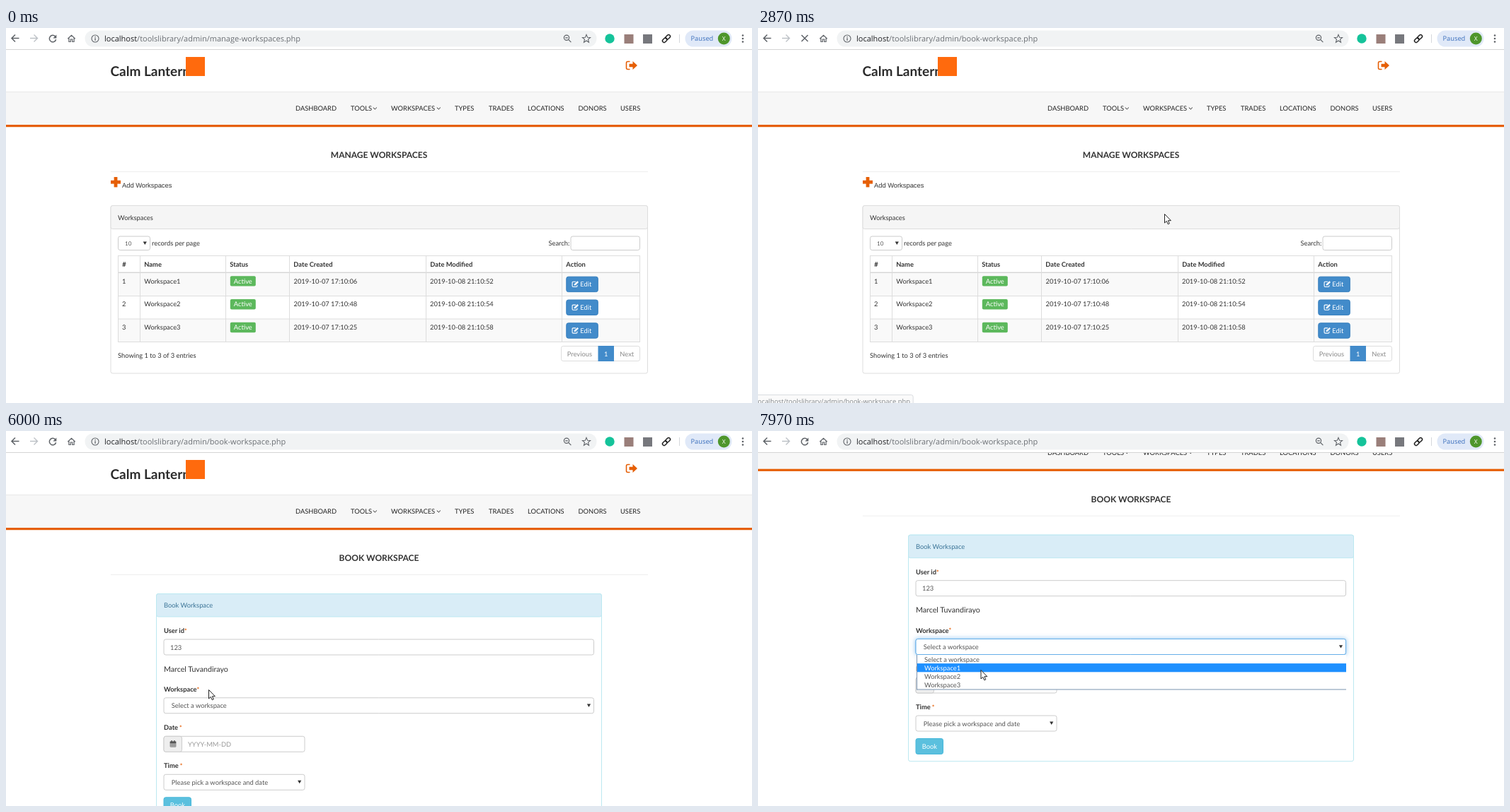
Write an HTML page with a canvas that moves like this. It is 1054 px wide and 531 px high and loops after 8000 ms.

```html
<!DOCTYPE html>
<html lang="en">
<head>
<meta charset="utf-8">
<title>Booking a workspace</title>
<style>
html, body { margin: 0; width: 100%; height: 100%; overflow: hidden; background: #fff; }
canvas { display: block; }
</style>
</head>
<body>
<canvas id="stage" width="1054" height="531"></canvas>
<script>
const ctx = document.getElementById('stage').getContext('2d', { alpha: false });
const LOOP = 8000;
const ORANGE = '#e65f06', BLUE = '#428bca', INK = '#333', ICON = '#5f6368';
const SITE = 'localhost/toolslibrary/admin/';

// Bursts of screen updates: first, last, number of updates.
const bursts = [
  [0, 0, 1], [220, 1000, 11], [1070, 1850, 11], [1930, 2540, 9], [2710, 3250, 8],
  [3420, 4130, 10], [4590, 4590, 1], [4740, 4740, 1], [4900, 4980, 2], [5130, 5910, 11],
  [6000, 6370, 6], [6520, 6910, 6], [7060, 7820, 11], [7900, 7970, 2]
];

// Pointer path: time, x, y.
const path = [
  [0, 985, 560], [210, 968, 522], [1000, 547, 111], [1070, 562, 105], [1148, 568, 115],
  [1850, 573, 224], [2540, 574, 263], [3341, 574, 263], [3578, 553, 282], [4050, 500, 310],
  [5052, 500, 310], [5500, 133, 343], [5620, 133, 343], [5910, 258, 361], [6000, 286, 366],
  [6370, 330, 403], [6600, 330, 403], [6910, 333, 350], [6985, 333, 350], [7362, 312, 301],
  [7590, 312, 303], [7820, 314.5, 333], [7970, 314.5, 338]
];

function snap(t) {
  const [start, end, count] = bursts.filter(b => b[0] <= t).pop();
  if (count === 1) return start;
  const step = (end - start) / (count - 1);
  return Math.min(end, start + Math.floor((t - start) / step + 1e-6) * step);
}

function pointerAt(t) {
  const i = path.findIndex(p => p[0] >= t);
  if (i <= 0) return path[0].slice(1);
  const [t0, x0, y0] = path[i - 1], [t1, x1, y1] = path[i];
  const p = (t - t0) / (t1 - t0), e = p * p * (3 - 2 * p);
  return [x0 + (x1 - x0) * e, y0 + (y1 - y0) * e];
}

function scrollAt(t) {
  if (t < 6520) return 0;
  const p = Math.min(1, (t - 6520 + 78) / 468);
  return 83.3 * (1 - (1 - p) ** 4.18);
}

// y is the middle of the capitals.
function text(s, x, y, { color = INK, size = 9.33, weight = 400, family = 'Lato', align = 'left' } = {}) {
  ctx.font = `${weight} ${size}px "${family}", sans-serif`;
  ctx.textAlign = align;
  ctx.fillStyle = color;
  ctx.fillText(s, x, y + size * 0.36);
  return ctx.measureText(s).width;
}

function rect(x, y, w, h, color) {
  ctx.fillStyle = color;
  ctx.fillRect(x, y, w, h);
}

function box(x, y, w, h, { fill = '#fff', stroke, r = 2.7 } = {}) {
  ctx.beginPath();
  ctx.roundRect(x + 0.5, y + 0.5, w - 1, h - 1, r);
  ctx.fillStyle = fill;
  ctx.fill();
  if (stroke) line(stroke);
}

function line(color, width = 1) {
  ctx.strokeStyle = color;
  ctx.lineWidth = width;
  ctx.stroke();
}

function circle(x, y, r, color) {
  ctx.beginPath();
  ctx.arc(x, y, r, 0, 7);
  ctx.fillStyle = color;
  ctx.fill();
}

function shape(d, x, y, { fill, stroke, width = 1 } = {}) {
  const p = new Path2D(d);
  ctx.save();
  ctx.translate(x, y);
  ctx.lineWidth = width;
  if (fill) { ctx.fillStyle = fill; ctx.fill(p); }
  if (stroke) { ctx.strokeStyle = stroke; ctx.stroke(p); }
  ctx.restore();
}

const arrowDown = (x, y) => shape('M-2.6-2H2.6L0 2.4Z', x, y, { fill: INK });

function field(x, y, w, h, focused) {
  if (focused) {
    ctx.save();
    ctx.shadowColor = 'rgba(102,175,233,.7)';
    ctx.shadowBlur = 6;
    box(x, y, w, h, { stroke: '#66afe9' });
    ctx.restore();
  }
  box(x, y, w, h, { stroke: focused ? '#66afe9' : '#ccc' });
}

function toolbar(t) {
  const loading = t >= 2710 && t < 3250;
  const pen = { stroke: ICON, width: 1.5 };
  rect(0, 0, 1054, 30, '#fff');
  rect(0, 30, 1054, 1, '#d4d4d4');
  shape('M5.5 0H-5M0-5L-5 0 0 5', 13, 14.5, pen);
  shape('M-5.5 0H5M0-5L5 0 0 5', 39.5, 14.5, { stroke: '#bdc1c6', width: 1.4 });
  if (loading) shape('M-4.5-4.5L4.5 4.5M4.5-4.5L-4.5 4.5', 66, 14.5, pen);
  else {
    shape('M3.6-3A4.7 4.7 0 1 0 4.6 1.2', 66, 15, pen);
    shape('M5.3-5.5V-.6H.4Z', 66, 15, { fill: ICON });
  }
  shape('M-5.2.3L0-4.6 5.2.3M-3.6-.8V4.5H-1.2V1H1.2V4.5H3.6V-.8', 92.5, 15, { stroke: ICON, width: 1.2 });

  box(111, 3, 724, 24, { fill: '#f1f3f4', r: 12 });
  ctx.beginPath();
  ctx.arc(126, 15, 5, 0, 7);
  line(ICON, 1.1);
  rect(125.4, 14.2, 1.3, 3.6, ICON);
  rect(125.4, 12, 1.3, 1.3, ICON);
  const url = { size: 11, family: 'Open Sans' };
  const hostWidth = text('localhost', 139, 15, { ...url, color: '#202124' });
  const page = t < 2710 ? 'manage-workspaces.php' : 'book-workspace.php';
  text('/toolslibrary/admin/' + page, 139 + hostWidth, 15, { ...url, color: '#6b6f74' });

  ctx.beginPath();
  ctx.arc(792, 13.8, 3.6, 0, 7);
  line(ICON, 1.2);
  shape('M2.6 2.6L6.4 6.4M-1.8 0H1.8', 792, 13.8, { stroke: ICON, width: 1.2 });
  shape('M0-5.6L1.6-1.8 5.6-1.5 2.5 1.2 3.5 5.2 0 3 -3.5 5.2-2.5 1.2-5.6-1.5-1.6-1.8Z', 820, 15, { stroke: ICON, width: 1.1 });

  circle(853, 15, 6.7, '#15c39a');
  rect(873.5, 9, 13, 13, '#9a7f7a');
  rect(900, 9, 13, 13, '#77787d');
  ctx.save();
  ctx.translate(933, 15);
  ctx.rotate(-Math.PI / 4);
  for (const x of [-6.8, -0.4]) {
    ctx.beginPath();
    ctx.roundRect(x, -2.3, 7.2, 4.6, 2.3);
    line('#222', 1.5);
  }
  ctx.restore();
  rect(951, 9, 1, 12, '#d5d8dc');
  box(959, 3, 67, 24, { fill: '#e0e9f8', r: 12 });
  text('Paused', 967.5, 15, { size: 9.3, family: 'Open Sans', color: '#3b70bd' });
  circle(1014.3, 15, 8.5, '#4e962c');
  text('X', 1014.3, 15, { size: 8.5, family: 'Open Sans', color: '#fff', align: 'center' });
  for (const y of [10.5, 15, 19.5]) circle(1041, y, 1.3, ICON);
}

function header(menuOpen) {
  text('Calm Lantern', 147.5, 61.5, { size: 19, weight: 700, color: '#2b2b2b' });
  rect(254, 41, 27, 27, '#ff6a0d');
  shape('M6 1H3Q1 1 1 3V10Q1 12 3 12H6', 875.5, 46.5, { stroke: ORANGE, width: 1.6 });
  shape('M5 4.3H10V.5L16.5 6.5 10 12.5V8.7H5Z', 875.5, 46.5, { fill: ORANGE });

  rect(0, 90, 1054, 47, '#f7f7f7');
  rect(0, 90, 1054, 1, '#e9e9e9');
  if (menuOpen) rect(534, 91, 90, 46, '#ebebeb');
  rect(0, 137, 1054, 3.2, ORANGE);
  const items = { DASHBOARD: 409, TOOLS: 487, WORKSPACES: 544, TYPES: 634, TRADES: 682, LOCATIONS: 737, DONORS: 808.5, USERS: 868 };
  for (const [label, x] of Object.entries(items)) text(label, x, 113.5, { color: '#222' });
  for (const x of [521.3, 611.3]) shape('M-2.5-1.2L0 1.2 2.5-1.2', x, 113.8, { stroke: '#222' });
}

function heading(title) {
  text(title, 527, 179.5, { size: 12, weight: 700, align: 'center' });
  rect(148, 203, 759, 1, '#eee');
}

function managePage() {
  heading('MANAGE WORKSPACES');
  rect(148, 215.8, 14, 4.8, ORANGE);
  rect(152.6, 211, 4.8, 14.4, ORANGE);
  text('Add Workspaces', 164, 222.5, { family: 'Liberation Sans' });

  box(147.5, 251, 759.5, 238.5, { stroke: '#ddd' });
  box(147.5, 251, 759.5, 34, { fill: '#f5f5f5', stroke: '#ddd' });
  text('Workspaces', 158, 268.3);

  field(158, 294.5, 46, 20.5);
  text('10', 168, 305.3, { size: 8, color: '#555' });
  arrowDown(196.3, 304.5);
  text('records per page', 206, 304.3);
  text('Search:', 796.3, 304.3, { align: 'right' });
  field(797.5, 294.5, 98.5, 20.5);

  const columns = { '#': 158, Name: 189, Status: 310, 'Date Created': 400, 'Date Modified': 593, Action: 785 };
  rect(158, 346, 738, 33, '#f9f9f9');
  rect(158, 412, 738, 33, '#f9f9f9');
  for (const y of [322, 379, 411.5, 444]) rect(158, y, 738, 1, '#ddd');
  rect(158, 345.6, 738, 1.4, '#d5d5d5');
  for (const [label, x] of Object.entries(columns)) {
    rect(x, 322, 1, 123, '#ddd');
    text(label, x + 6.3, 335, { weight: 700 });
  }
  rect(895, 322, 1, 123, '#ddd');

  [['06', '52'], ['48', '54'], ['25', '58']].forEach(([created, modified], i) => {
    const y = 358.3 + i * 32.8;
    text(i + 1, 164, y);
    text('Workspace' + (i + 1), 195.3, y);
    box(316.3, y - 7.6, 37, 15.4, { fill: '#5cb85c', r: 2 });
    text('Active', 321.8, y, { color: '#fff' });
    text('2019-10-07 17:10:' + created, 406.5, y);
    text('2019-10-08 21:10:' + modified, 599, y);
    box(791.3, y - 6.6, 45.5, 22.4, { fill: BLUE, stroke: '#357ebd' });
    shape('M5.5 1H1.8Q.6 1 .6 2.2V7Q.6 8.2 1.8 8.2H6.3Q7.5 8.2 7.5 7V5.6', 799.5, y, { stroke: '#fff', width: 1.1 });
    shape('M3.2 6.2V4.4L7.8 0 9.5 1.7 5 6.2Z', 799.5, y, { fill: '#fff' });
    text('Edit', 811.3, y + 4.8, { color: '#fff' });
  });

  text('Showing 1 to 3 of 3 entries', 158, 463.3);
  box(784, 450, 112, 22, { stroke: '#ddd' });
  rect(836.5, 450, 22.5, 22, BLUE);
  text('Previous', 792.8, 461.3, { color: '#888' });
  text('1', 847.8, 461.3, { color: '#fff', align: 'center' });
  text('Next', 867.3, 461.3, { color: '#888' });
}

function menu() {
  ctx.save();
  ctx.shadowColor = 'rgba(0,0,0,.25)';
  ctx.shadowBlur = 8;
  ctx.shadowOffsetY = 4;
  box(499, 137, 125, 145.5, { r: 1.5 });
  ctx.restore();
  box(499, 137, 125, 145.5, { stroke: '#c6c6c6', r: 1.5 });
  ['MANAGE WORKSPACES', 'BOOKED WORKSPACES', 'BOOK A WORKSPACE'].forEach((label, i) =>
    text(label, 509.3, 164 + i * 46, { color: '#222' }));
}

function label(s, y, gap = 0) {
  const w = text(s, 223, y, { weight: 700 });
  text('*', 223 + w + gap, y, { weight: 700, color: ORANGE, size: 8.6 });
}

function bookPage(t, pointerY) {
  const named = t >= 5680;
  const shift = named ? 28.8 : 0;
  const focused = t >= 4050 && !named;
  const listOpen = t >= 7430;
  heading('BOOK WORKSPACE');
  box(212, 230, 630, 292.7 + shift, { stroke: '#bce8f1' });
  box(212, 230, 630, 33.5, { fill: '#d9edf7', stroke: '#bce8f1' });
  text('Book Workspace', 223, 246.8, { color: '#3a7396' });

  label('User id', 282.8);
  field(222.5, 294.5, 608.5, 23, focused);
  const typed = '123'.slice(0, [4740, 4900, 4980].filter(at => t >= at).length);
  const typedWidth = text(typed, 232, 306.2, { color: '#555' });
  if (focused && (t < 4590 || t >= 4740)) rect(232 + typedWidth, 300, 1, 12, '#333');
  if (named) text('Marcel Tuvandirayo', 223, 336.8, { size: 10.67 });

  ctx.save();
  ctx.translate(0, shift);
  label('Workspace', 336.8);
  field(222.5, 348.5, 608.5, 23, t >= 7360);
  text('Select a workspace', 233.8, 360.3, { color: '#555' });
  arrowDown(823.5, 359.7);

  label('Date', 391, 2);
  field(222.5, 403, 200, 23);
  box(222.5, 403, 26.5, 23, { fill: '#eee', stroke: '#ccc' });
  shape('M-3.8-2.9H3.8V4H-3.8ZM-3.8-.8H3.8M-3.8 1.6H3.8M-1.3-.8V4M1.3-.8V4', 236, 414.3, { stroke: '#555', width: 0.8 });
  shape('M-4.2-3.6H4.2V-1.2H-4.2ZM-2.6-5H-1.2V-3H-2.6ZM1.2-5H2.6V-3H1.2Z', 236, 414.3, { fill: '#555' });
  text('YYYY-MM-DD', 257, 414.5, { color: '#999' });

  label('Time', 445.3, 2);
  field(222.5, 457, 200, 23);
  text('Please pick a workspace and date', 233.8, 469, { color: '#555' });
  arrowDown(414.7, 468);
  box(222.5, 489.5, 39.5, 23, { fill: '#5bc0de', stroke: '#46b8da' });
  text('Book', 231.8, 501.3, { color: '#fff' });

  if (listOpen) {
    const top = 371.5, rowHeight = 12.15;
    const active = pointerY > 329 ? 1 : 0;
    rect(224, top, 607, 49.3, '#fff');
    rect(224, top, 1, 49.3, '#7b93b0');
    rect(224, top + 48.5, 607, 1, '#7b93b0');
    ['Select a workspace', 'Workspace1', 'Workspace2', 'Workspace3'].forEach((option, i) => {
      if (i === active) rect(225, top + i * rowHeight, 606, rowHeight, '#1e90ff');
      text(option, 235, top + 6.2 + i * rowHeight, { color: i === active ? '#fff' : '#555' });
    });
  }
  ctx.restore();
}

function statusBar(t, pointerY) {
  const target = pointerY < 137 ? 'manage-workspaces.php#'
    : pointerY < 187 ? 'manage-workspaces.php'
    : pointerY < 232 ? 'manage-bookings.php' : 'book-workspace.php';
  const style = { size: 9.35, family: 'Open Sans', color: '#80868b' };
  ctx.font = `${style.size}px "Open Sans", sans-serif`;
  const width = ctx.measureText(SITE + target).width;
  box(-6, 519, width + 8, 20, { fill: '#fafafa', stroke: '#dadce0' });
  text(SITE + target, -2.8, 528.8, style);
}

function pointer(t, x, y, menuOpen) {
  const white = { fill: '#fff', stroke: '#222' };
  const overInput = t > 3420 && t < 5900 && x > 223 && y > 295 && y < 317;
  if (menuOpen) {
    shape('M-1.5 9V1.5A1.5 1.5 0 0 1 1.5 1.5V5.5L6 6.7Q7.6 7.2 7.4 9L6.6 12.8 5.8 16H-.5L-4.8 10.6Q-5.4 8.6-3.6 8.4Z', x, y, white);
    shape('M1.5 5.5V8.5M3.6 6.2V8.8M5.6 6.8V9', x, y, { stroke: '#222', width: 0.7 });
  } else if (overInput) {
    shape('M-2.5-7.5H-.6L0-7 .6-7.5H2.5M0-7V7M-2.5 7.5H-.6L0 7 .6 7.5H2.5', x, y, { stroke: '#222' });
  } else {
    shape('M.5.5V13L3.3 10.4 5.3 14.8 7.3 13.9 5.4 9.7H9.4Z', x, y, white);
  }
}

function draw(time) {
  const t = snap(time % LOOP);
  const [x, y] = pointerAt(t);
  const menuOpen = t >= 1070 && t < 2710;
  const booking = t >= 3090;
  ctx.textRendering = 'geometricPrecision';
  rect(0, 0, 1054, 531, '#fff');
  ctx.save();
  ctx.translate(0, -scrollAt(t));
  header(menuOpen);
  if (booking) bookPage(t, y);
  else managePage();
  if (menuOpen) menu();
  ctx.restore();
  toolbar(t);
  if (t >= 1070 && !booking) statusBar(t, y);
  pointer(t, x, y, menuOpen);
}

function frame() {
  draw(performance.now());
  requestAnimationFrame(frame);
}
frame();
</script>
</body>
</html>
```
